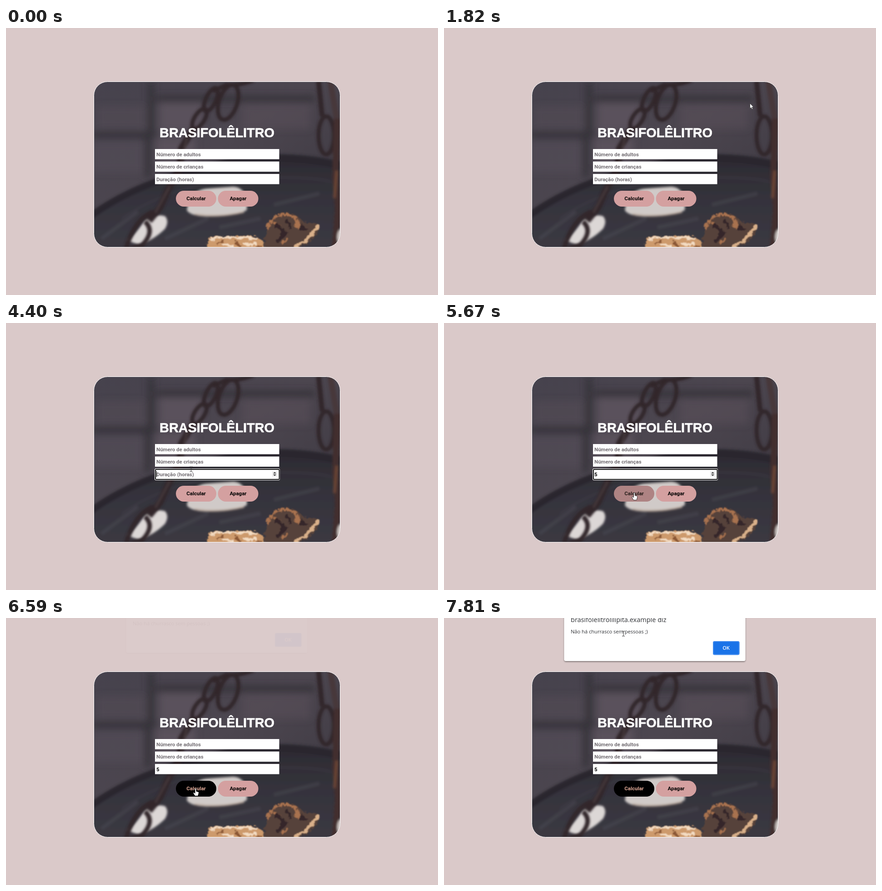
Animation of 951x589 px, one loop 8000 ms. Source, as an HTML page:

```html
<!DOCTYPE html>
<html lang="pt">
<head>
<meta charset="utf-8">
<title>Calculadora</title>
<style>
  html, body { margin: 0; height: 100%; overflow: hidden; background: #dac9c9; }
  svg { display: block; width: 100vw; height: 100vh; }
  .ui { font: 700 11.5px Roboto, sans-serif; }
  .hint { fill: #757075; }
  .title { font: 700 28.8px "Liberation Sans", sans-serif; fill: #fff; stroke: #fff; stroke-width: .6; }
  .dialog { font-family: "Open Sans", sans-serif; fill: #303236; }
  .middle { text-anchor: middle; }
</style>
</head>
<body>
<svg viewBox="0 0 951 589">
  <defs>
    <clipPath id="card"><rect x="193.5" y="118.5" width="542" height="365" rx="30"/></clipPath>
    <linearGradient id="wall" x2="1" y2="1">
      <stop stop-color="#46424d"/><stop offset=".45" stop-color="#4c464f"/><stop offset="1" stop-color="#39353e"/>
    </linearGradient>
    <linearGradient id="pan" x2="0" y2="1">
      <stop stop-color="#2c2a31"/><stop offset=".5" stop-color="#35333c"/><stop offset="1" stop-color="#3b3942"/>
    </linearGradient>
    <filter id="soft" x="-20%" y="-20%" width="140%" height="140%"><feGaussianBlur stdDeviation="8"/></filter>
    <filter id="slight" x="-20%" y="-20%" width="140%" height="140%"><feGaussianBlur stdDeviation="2.6"/></filter>
    <filter id="rough" x="-20%" y="-20%" width="140%" height="140%">
      <feTurbulence baseFrequency=".07" numOctaves="3" seed="4"/>
      <feDisplacementMap in="SourceGraphic" scale="12" xChannelSelector="R" yChannelSelector="G"/>
      <feGaussianBlur stdDeviation="1.2"/>
    </filter>
    <filter id="shade"><feDropShadow dx="0" dy="1.5" stdDeviation="1.5" flood-opacity=".5"/></filter>
  </defs>

  <rect width="951" height="589" fill="#dac9c9"/>

  <g clip-path="url(#card)">
    <rect x="193" y="118" width="543" height="366" fill="url(#wall)"/>
    <g filter="url(#soft)">
      <g fill="#5a515b">
        <rect x="338" y="165" width="95" height="62"/>
        <rect x="332" y="242" width="85" height="58"/>
        <rect x="520" y="168" width="150" height="55" opacity=".5"/>
        <rect x="190" y="250" width="112" height="68" opacity=".45"/>
        <rect x="200" y="172" width="105" height="50" opacity=".4"/>
      </g>
      <g fill="none" stroke="#353139" stroke-width="13">
        <path d="M330 156H680M190 236H330M319 120V235M312 236V330"/>
      </g>
    </g>
    <g filter="url(#slight)">
      <path d="M185 412Q290 335 440 300Q590 258 745 296V490H185Z" fill="url(#pan)"/>
      <path d="M185 416Q290 339 440 308Q590 268 745 306" fill="none" stroke="#29272d" stroke-width="15"/>
      <path d="M255 420Q380 335 560 330T745 360" fill="none" stroke="#45444d" stroke-width="5" opacity=".3"/>
      <path d="M210 465L290 405M350 465L445 420M470 440L560 420M590 390L690 365" stroke="#55545c" stroke-width="9" opacity=".3"/>
    </g>
    <g filter="url(#slight)">
      <path d="M398 402Q405 356 445 354L500 350Q534 352 530 402Q500 417 440 416Q405 414 398 402Z" fill="#d0cac8"/>
      <path d="M415 411Q470 419 524 406" fill="none" stroke="#b9a595" stroke-width="3"/>
      <path d="M268 469Q288 451 304 426Q322 408 350 415Q360 426 350 443Q325 468 292 478Z" fill="#dcd7d6"/>
    </g>
    <g filter="url(#rough)">
      <path d="M441 488Q437 465 455 459L505 456Q552 453 563 466L567 488Z" fill="#cd9a6c"/>
      <path d="M452 464Q500 456 552 463M470 478H500M520 474H548" fill="none" stroke="#f3dcc2" stroke-width="5"/>
      <path d="M460 473L478 468M502 470L516 482M548 480H560" fill="none" stroke="#8a5735" stroke-width="5"/>
      <path d="M566 488Q568 425 598 406Q635 400 646 423L688 432Q686 455 643 486Z" fill="#57423b"/>
      <path d="M572 440Q585 405 620 409Q644 418 640 440M585 425L600 435M605 472L618 462" fill="none" stroke="#a8724f" stroke-width="5"/>
      <path d="M686 434Q668 452 658 466L632 484" fill="none" stroke="#d9b08a" stroke-width="8"/>
      <path d="M590 430L613 448 595 469M612 421L625 438M645 438L660 444" fill="none" stroke="#35282a" stroke-width="8"/>
    </g>
    <g fill="none" stroke="#30262b" stroke-width="9" filter="url(#slight)">
      <path d="M545 115Q515 128 485 125L455 140"/>
      <ellipse cx="489" cy="164" rx="20" ry="40" transform="rotate(18 489 164)"/>
      <ellipse cx="451" cy="158" rx="11" ry="28" transform="rotate(25 451 158)"/>
      <ellipse cx="426" cy="200" rx="11" ry="25" transform="rotate(32 426 200)"/>
      <path d="M414 219L386 266 383 309 356 358 340 395 315 425" stroke-width="15"/>
      <path d="M400 235L385 300M360 350L329 407" stroke="#463a3d" stroke-width="4"/>
      <path d="M324 405Q283 421 264 487M306 427Q329 448 300 479L273 487" stroke-width="10"/>
      <path d="M688 117L696 195" stroke-width="11"/>
      <ellipse cx="705" cy="237" rx="17" ry="42"/>
      <path d="M714 117L728 200" stroke="#47373b" stroke-width="13"/>
      <path d="M729 200L725 330 731 400 724 487" stroke="#422f2d" stroke-width="14"/>
      <path d="M728 315L723 375" stroke="#6b4535" stroke-width="6"/>
      <ellipse cx="738" cy="461" rx="9" ry="17" fill="#d3cbc8" stroke="none"/>
    </g>
  </g>
  <rect x="193.5" y="118.5" width="542" height="365" rx="30" fill="none" stroke="#fff"/>

  <text class="title middle" x="464.5" y="241">BRASIFOLÊLITRO</text>

  <g class="ui">
    <g fill="#fff">
      <rect x="328" y="267" width="273.5" height="22.5"/>
      <rect x="328" y="294.5" width="273.5" height="22.5"/>
      <rect x="328" y="322" width="273.5" height="22.5"/>
    </g>
    <g id="focus">
      <rect x="327" y="321" width="276" height="26" rx="3" fill="#fff"/>
      <rect x="329" y="323" width="272.5" height="22" rx="1.5" fill="#fff" stroke="#101010" stroke-width="2"/>
    </g>
    <text class="hint" x="331" y="282.5">Número de adultos</text>
    <text class="hint" x="331" y="309.5">Número de crianças</text>
    <text id="hours" x="331" y="337.5"></text>
    <path id="caret" d="M0 326.5V340" stroke="#000"/>
    <g id="spinner">
      <rect x="586" y="-6" width="11" height="12" fill="#eee"/>
      <path d="M588-1L591.5-4.5 595-1ZM588 1L591.5 4.5 595 1Z" fill="#444"/>
    </g>
    <rect id="button" x="374" y="359" width="89" height="35" rx="17.5"/>
    <rect x="466.5" y="359" width="89" height="35" rx="17.5" fill="#d4a0a0"/>
    <text id="label" class="middle" x="418.5" y="380">Calcular</text>
    <text class="middle" x="511" y="380">Apagar</text>
  </g>

  <g id="dialog" class="dialog">
    <rect x="264.5" y="-40" width="399" height="135" rx="4" fill="#fff" filter="url(#shade)"/>
    <text x="279" y="8.5" font-size="14.5">brasifolelitrolilipita.example diz</text>
    <text x="279" y="33.5" font-size="11.1">Não há churrasco sem pessoas ;)</text>
    <rect x="592" y="51" width="58.5" height="30.5" rx="3.5" fill="#1a73e8"/>
    <rect x="593" y="52" width="56.5" height="28.5" rx="3" fill="none" stroke="#4a90f0" stroke-width="1.5"/>
    <text class="middle" x="621" y="70" font-size="11" font-weight="600" fill="#fff">OK</text>
  </g>

  <g id="pointer">
    <path id="arrow" d="M0 0V11.5L2.7 9 4.5 13 6.3 12.2 4.6 8.3H8Z" fill="#fff" stroke="#222" stroke-width=".7"/>
    <path id="beam" d="M-3-5.5H-.8L0-5 .8-5.5H3M0-5V5M-3 5.5H-.8L0 5 .8 5.5H3" fill="none" stroke="#333"/>
    <path id="hand" d="M-1.4 1A1.4 1.4 0 0 1 1.4 1V6L5.6 7A1.6 1.6 0 0 1 6.8 8.8L6.1 12.5 5 16H-1.5L-4.9 10.5Q-5.6 8.4-4 8.3L-1.4 10.2Z" fill="#fff" stroke="#111" stroke-width=".8"/>
  </g>
</svg>
<script>
const LOOP = 8000;
const el = id => document.getElementById(id);
const show = (id, on) => el(id).setAttribute("visibility", on ? "visible" : "hidden");
const clamp = v => Math.max(0, Math.min(1, v));
const mix = (a, b, k) => a + (b - a) * k;
const rgb = (a, b, k) => `rgb(${a.map((v, i) => Math.round(mix(v, b[i], k)))})`;

// time, x, y, cursor shape from this moment on
const pointerPath = [
  [0, 906, 571, ""], [390, 906, 571, "arrow"], [600, 857, 402, "arrow"],
  [800, 857, 402, "arrow"], [1270, 757, 192, "arrow"], [1470, 757, 192, "arrow"],
  [1650, 705, 172, "arrow"], [1820, 674, 166, "arrow"], [2000, 594, 220, "arrow"],
  [2110, 540, 270, "beam"], [2230, 500, 312, "beam"], [2300, 497, 320, "beam"],
  [2650, 482.5, 337, "beam"], [3510, 482.5, 337, "beam"], [4260, 408, 322.5, "beam"],
  [4400, 407.5, 322.5, "beam"], [4660, 407.5, 322.5, ""], [5330, 407.5, 322.5, "beam"],
  [5420, 410, 346, "arrow"], [5540, 416, 366, "hand"], [5640, 419, 374.5, "hand"],
  [6090, 417.5, 376.5, "hand"], [7320, 417.5, 376.5, "hand"], [7390, 423, 335, "arrow"],
  [7500, 425, 215, "arrow"], [7620, 403, 90, "arrow"], [7720, 389, 42, "beam"],
  [7810, 395, 34.5, "beam"], [LOOP, 395, 34.5, "beam"]
];

// time, vertical offset, opacity
const dialogPath = [
  [0, -20, 0], [6520, -20, 0], [6590, -18, .025], [6650, -11, .6],
  [6720, -4.3, .99], [6790, 0, 1], [LOOP, 0, 1]
];

function sample(path, t) {
  const i = path.findIndex(p => p[0] > t);
  const a = path[i - 1], b = path[i], k = (t - a[0]) / (b[0] - a[0]);
  return [mix(a[1], b[1], k), mix(a[2], b[2], k), a[3]];
}

const between = (t, a, b) => t >= a && t < b;

function draw(t) {
  const [x, y, shape] = sample(pointerPath, t);
  el("pointer").setAttribute("transform", `translate(${x} ${y})`);
  for (const s of ["arrow", "beam", "hand"]) show(s, s === shape);

  const typed = t >= 4660, focused = between(t, 3050, 6500);
  show("focus", focused);
  el("hours").textContent = typed ? "5" : "Duração (horas)";
  el("hours").setAttribute("class", typed ? "" : "hint");
  el("caret").setAttribute("transform", `translate(${typed ? 339.5 : 331.5} 0)`);
  show("caret", between(t, 3050, 3580) || between(t, 4110, 5330) || between(t, 5860, 6390));

  const hovered = between(t, 2110, 2300) ? (y < 292 ? 278.5 : 305.5) : 333;
  show("spinner", focused || between(t, 2110, 3050));
  el("spinner").setAttribute("transform", `translate(0 ${hovered})`);

  const p = clamp((t - 5540) / 690), hover = p * p * (3 - 2 * p);
  const fade = clamp(hover * 1.9);
  el("button").setAttribute("fill", rgb([212, 160, 160], [0, 0, 0], fade));
  el("label").setAttribute("fill", rgb([0, 0, 0], [222, 168, 150], fade));

  const [shift, opacity] = sample(dialogPath, t);
  el("dialog").setAttribute("transform", `translate(0 ${shift})`);
  el("dialog").setAttribute("opacity", opacity);
}

const start = performance.now();
function tick() {
  draw((performance.now() - start) % LOOP);
  requestAnimationFrame(tick);
}
tick();
</script>
</body>
</html>
```
